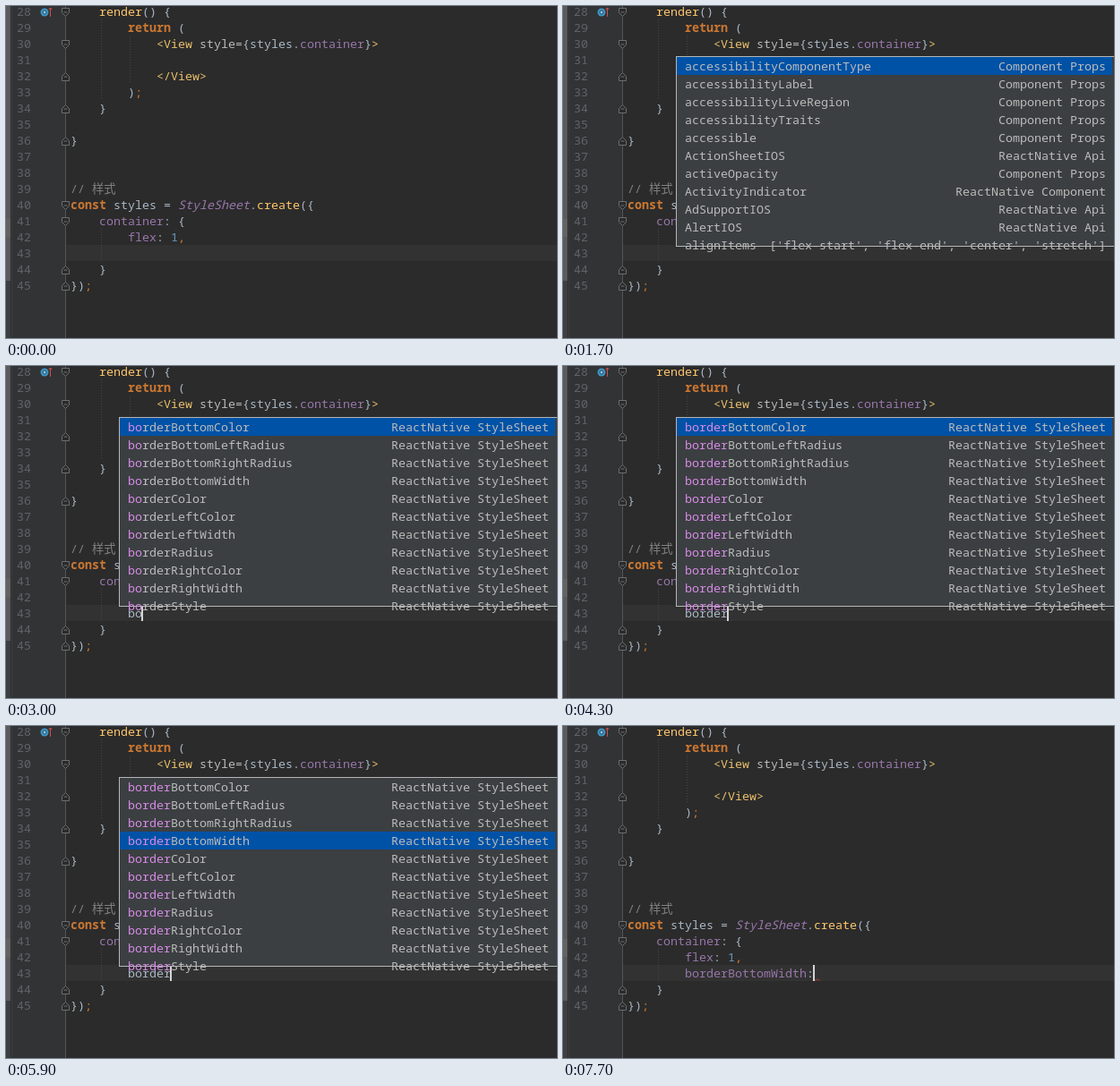
Animation, 615 px wide and 371 px high, one loop 8000 ms. Source, as an HTML page:

```html
<!DOCTYPE html>
<html lang="en">
<head>
<meta charset="utf-8">
<title>Style property completion</title>
<style>
  html, body { margin: 0; width: 100%; height: 100%; overflow: hidden; background: #2b2b2b; }
  svg { display: block; }
  text { font: 13.333px "Noto Sans Mono", "Noto Sans CJK SC", "Noto Sans CJK", monospace; white-space: pre; fill: #a9b7c6; }
  .num { fill: #606366; }
  .key { fill: #cc7832; font-weight: bold; }
  .punc { fill: #cc7832; }
  .fn { fill: #ffc66d; }
  .tag { fill: #e8bf6a; }
  .attr { fill: #bababa; }
  .prop { fill: #9876aa; }
  .type { fill: #9876aa; font-style: italic; }
  .val { fill: #6897bb; }
  .note { fill: #808080; }
  #popup text { fill: #bbbbbb; }
  #popup .hit { fill: #d68be6; }
  .guide { stroke: #484848; stroke-dasharray: 1 2; }
  .fold { fill: #2b2b2b; stroke: #6b6e70; }
</style>
</head>
<body>
<svg width="615" height="371" viewBox="0 0 615 371">
  <rect width="615" height="371" fill="#2b2b2b"/>
  <rect width="66" height="371" fill="#313335"/>
  <rect width="7" height="371" fill="#3c3f41"/>
  <rect width="5" height="307" fill="#595b5d"/>
  <rect y="238" width="5" height="20" fill="#62645f"/>
  <rect x="5" width="1" height="371" fill="#2b2b2b"/>
  <rect x="67" y="267" width="548" height="18" fill="#323232"/>
  <path d="M66.5 0V371" stroke="#555555"/>
  <path class="guide" d="M106.5 15V105M138.5 33V87M106.5 249V285"/>
  <g id="folds"></g>
  <circle cx="43" cy="7" r="4.5" fill="#3e93c4"/>
  <circle cx="43" cy="7" r="2" fill="#8fc6e4" stroke="#24506b"/>
  <path d="M49.5 12V2M47.5 4l2-2 2 2" fill="none" stroke="#d2504c"/>
  <g id="code"></g>
  <g id="typed"></g>
  <path id="error" d="M280 282.500l2 2 2-2 2 2 1-1" fill="none" stroke="#bc3f3c"/>
  <rect id="caret" y="267" width="2" height="18" fill="#d4d4d4"/>
  <g id="popup">
    <rect id="frame" x="126.5" width="500" fill="#3c3f41" stroke="#b4b6b7"/>
    <rect id="pick" x="127" width="486" height="20" fill="#0052a6"/>
    <g id="rows"></g>
    <g id="bulb">
      <circle cx="618" cy="67.500" r="6" fill="#f4cf52"/>
      <rect x="614" y="72" width="8" height="4" fill="#9a9da0"/>
    </g>
  </g>
</svg>
<script>
const $ = id => document.getElementById(id);
const LOOP = 8000, CH = 8, FIRST = 28;
const top_ = line => 267 + (line - 43) * 18;
const esc = s => s.replace(/&/g, '&amp;').replace(/</g, '&lt;');
const span = (cls, s) => `<tspan class="${cls}">${esc(s)}</tspan>`;
const text = (x, y, body, extra = '') => `<text x="${x}" y="${y}" ${extra}>${body}</text>`;

// Each line: indent in columns, then [class, string] pairs
const lines = {
  28: [4, 'fn', 'render', '', '() {'],
  29: [8, 'key', 'return', '', ' ('],
  30: [12, 'tag', '<View ', 'attr', 'style=', '', '{styles.', 'prop', 'container', '', '}', 'tag', '>'],
  32: [12, 'tag', '</View>'],
  33: [8, '', ')', 'punc', ';'],
  34: [4, '', '}'],
  36: [0, '', '}'],
  39: [0, 'note', '// 样式'],
  40: [0, 'key', 'const', '', ' styles = ', 'type', 'StyleSheet', '', '.', 'fn', 'create', '', '({'],
  41: [4, 'prop', 'container', '', ': {'],
  42: [8, 'prop', 'flex', '', ': ', 'val', '1', 'punc', ','],
  44: [4, '', '}'],
  45: [0, '', '})', 'punc', ';']
};

function drawCode() {
  let out = '';
  for (let n = FIRST; n <= 45; n++) {
    const y = top_(n) + 14;
    out += text(12, y, n, 'class="num"');
    if (!lines[n]) continue;
    const [indent, ...parts] = lines[n];
    let body = '';
    for (let i = 0; i < parts.length; i += 2) body += span(parts[i], parts[i + 1]);
    out += text(72 + indent * CH, y, body);
  }
  $('code').innerHTML = out;

  const mark = (n, d) => `<path class="fold" transform="translate(62.5 ${top_(n) + 5.5})" d="${d}M2 4.500h4"/>`;
  $('folds').innerHTML =
    [28, 30, 40, 41].map(n => mark(n, 'M0 0h8v5l-4 4-4-4z')).join('') +
    [32, 34, 36, 44, 45].map(n => mark(n, 'M0 9h8v-5l-4-4-4 4z')).join('');
}

const PROPS = 'Component Props', API = 'ReactNative Api', SHEET = 'ReactNative StyleSheet';
const withKind = (kind, names) => names.split(' ').map(n => [n, kind]);
const border = withKind(SHEET, 'BottomColor BottomLeftRadius BottomRightRadius BottomWidth Color LeftColor LeftWidth Radius RightColor RightWidth Style')
  .map(([n, k]) => ['border' + n, k]);
const lists = {
  all: [
    ...withKind(PROPS, 'accessibilityComponentType accessibilityLabel accessibilityLiveRegion accessibilityTraits accessible'),
    ['ActionSheetIOS', API], ['activeOpacity', PROPS],
    ['ActivityIndicator', 'ReactNative Component'],
    ['AdSupportIOS', API], ['AlertIOS', API],
    ['alignItems', "['flex-start', 'flex-end', 'center', 'stretch']"]
  ],
  b: [
    ...withKind(SHEET, 'backfaceVisibility backgroundColor'),
    ...withKind(PROPS, 'barStyle barTintColor'),
    ...border.slice(0, 7)
  ],
  border
};

// Each step changes only the named parts of the state
const steps = [
  [0, { typed: '', caret: 0, list: '', hit: 0, pick: 0, bulb: 0, lift: 0, done: 0 }],
  [600, { caret: 1 }],
  [1600, { caret: 0 }],
  [1700, { list: 'all', lift: 1 }],
  [1900, { caret: 1 }],
  [2000, { lift: 0 }],
  [2400, { caret: 0 }],
  [2500, { bulb: 1 }],
  [2700, { typed: 'b', hit: 1, list: 'b', caret: 1, bulb: 0 }],
  [3000, { typed: 'bo', hit: 2, list: 'border' }],
  [3500, { bulb: 1 }],
  [3800, { typed: 'bor', hit: 3, bulb: 0 }],
  [4000, { typed: 'bord', hit: 4 }],
  [4100, { typed: 'borde', hit: 5 }],
  [4200, { typed: 'border' }],
  [4300, { hit: 6 }],
  [4800, { bulb: 1 }],
  [5200, { caret: 0 }],
  [5500, { pick: 1, bulb: 0 }],
  [5700, { pick: 2, caret: 1 }],
  [5900, { pick: 3 }],
  [6200, { caret: 0 }],
  [6300, { bulb: 1 }],
  [6600, { caret: 1 }],
  [7100, { caret: 0 }],
  [7300, { typed: 'borderBottomWidth:', list: '', caret: 1 }],
  [7700, { done: 1 }]
];

const show = (id, on) => $(id).setAttribute('visibility', on ? 'visible' : 'hidden');

function drawPopup(s) {
  $('popup').style.display = s.list ? '' : 'none';
  if (!s.list) return;
  const y = 57 - s.lift;
  $('frame').setAttribute('y', y + 0.5);
  $('frame').setAttribute('height', 211 + s.lift);
  $('pick').setAttribute('y', y + 1 + s.pick * 20);
  $('rows').innerHTML = lists[s.list].map(([name, kind], i) => {
    const base = y + 16 + i * 20;
    return text(136, base, span('hit', name.slice(0, s.hit)) + esc(name.slice(s.hit))) +
      text(606, base, esc(kind), 'text-anchor="end"');
  }).join('');
  // The last row is cut by the lower edge
  $('rows').style.clipPath = 'polygon(0 0, 615px 0, 615px 268px, 0 268px)';
  $('rows').style.transformBox = 'view-box';
  $('bulb').style.display = s.bulb ? '' : 'none';
  $('bulb').setAttribute('transform', `translate(0 ${s.pick * 20})`);
}

function draw(s) {
  const body = s.done ? span('prop', s.typed.slice(0, -1)) + ':' : s.typed;
  $('typed').innerHTML = text(136, 281, body);
  $('caret').setAttribute('x', 135 + s.typed.length * CH);
  show('caret', s.caret);
  show('error', s.done);
  drawPopup(s);
}

// Cover the overflow of the half row with an SVG clip instead of box-relative clipping
function addClip() {
  const ns = 'http://www.w3.org/2000/svg';
  const clip = document.createElementNS(ns, 'clipPath');
  clip.id = 'cut';
  clip.innerHTML = '<rect width="615" height="268"/>';
  document.querySelector('svg').prepend(clip);
  $('rows').setAttribute('clip-path', 'url(#cut)');
}

let last = -1;
function tick() {
  const t = performance.now() % LOOP;
  const count = steps.filter(([at]) => at <= t).length;
  if (count !== last) {
    last = count;
    draw(Object.assign({}, ...steps.slice(0, count).map(step => step[1])));
  }
  requestAnimationFrame(tick);
}

drawCode();
addClip();
tick();
</script>
</body>
</html>
```
